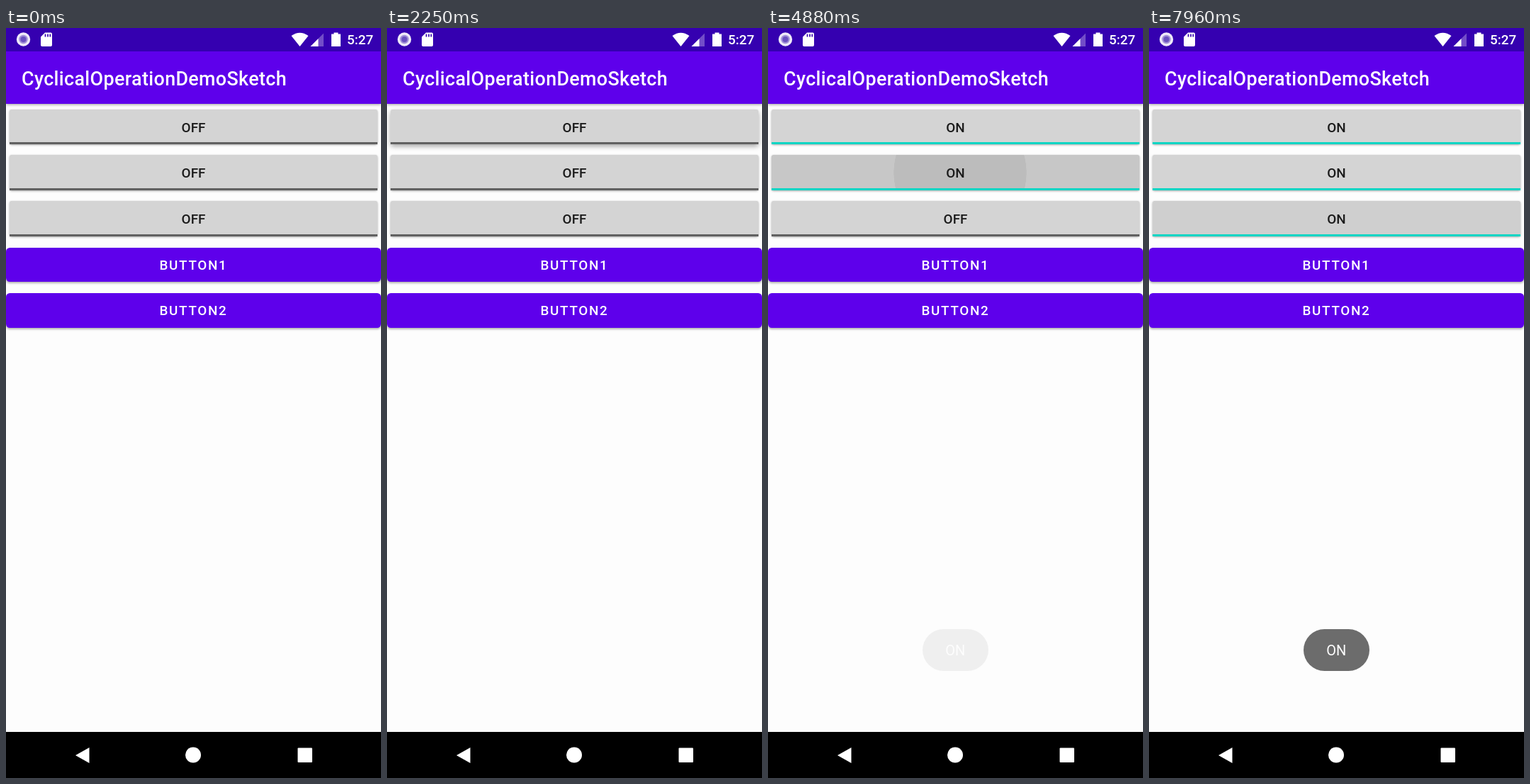
Write an HTML page that moves like this. It is 529x1058 px and loops after 8000 ms.

```html
<!DOCTYPE html>
<html lang="en">
<head>
<meta charset="utf-8">
<style>
  html, body { margin: 0; width: 100%; height: 100%; overflow: hidden; }
  body { position: relative; background: #fdfdfd; font: 500 18.86px Roboto, sans-serif; }
  body > *, .toggle > * { position: absolute; }
  .bar {
    left: 0; top: 0; width: 529px; height: 107px; background: #5e00eb;
    box-shadow: 0 1px 4px rgba(0, 0, 0, .4);
  }
  .status { left: 0; top: 0; width: 529px; height: 32.5px; background: #3500b0; }
  .title {
    left: 22px; top: 52px; line-height: 40px; font-size: 26.9px;
    letter-spacing: .0125em; color: #fff; white-space: nowrap;
  }
  .clock { left: 481px; top: 6px; line-height: 22px; color: #fff; }
  .toggle {
    left: 5px; width: 519px; height: 49.5px; border-radius: 3px;
    background: #d4d4d4; color: #1b1b1b; text-align: center; line-height: 52px;
  }
  .toggle > * { left: 0; width: 100%; }
  .ripple { top: 0; height: 100%; overflow: hidden; border-radius: 3px; }
  .line { bottom: 0; height: 3px; }
  .button {
    left: 0; width: 529px; height: 48.5px; border-radius: 5.4px; background: #5e00eb;
    color: #fff; text-align: center; line-height: 50px; letter-spacing: .0893em;
    box-shadow: 0 2px 3px rgba(0, 0, 0, .3);
  }
  .toast {
    left: 217.5px; top: 848px; width: 93.5px; height: 59px; border-radius: 29.5px;
    background: #646464; color: #fff; text-align: center; line-height: 60px;
    font-weight: 400; font-size: 20px; font-stretch: 75%;
  }
  svg { left: 0; top: 0; }
</style>
</head>
<body>
<div class="bar"></div>
<div class="status"></div>
<div class="title">CyclicalOperationDemoSketch</div>
<div class="clock">5:27</div>
<div class="button" style="top:309.5px">BUTTON1</div>
<div class="button" style="top:374.2px">BUTTON2</div>
<div class="toast">ON</div>
<svg width="529" height="1058" fill="#fff">
  <circle cx="24.5" cy="16" r="9.7" fill="#efeaf9"/>
  <circle cx="24.5" cy="16" r="6.2" fill="#a090d6"/>
  <circle cx="24.5" cy="16" r="4" fill="#6a50c0"/>
  <path d="M55 6.500H63Q65 6.500 65 8.500V24Q65 26 63 26H51Q49 26 49 24V12.500Z"/>
  <path d="M55.500 8.500v4M59 8.500v4M62.300 8.500v4" stroke="#3500b0" stroke-width="1.700"/>
  <path d="M402.500 11Q414.500 2.500 426.500 11L414.500 26Z"/>
  <path d="M448 7.500V26H429.500Z" opacity=".3"/>
  <path d="M440.500 15V26H429.500Z"/>
  <path d="M462.500 8.500V6.500H468.500V8.500H472V26H459V8.500Z"/>
  <rect y="993" width="529" height="65" fill="#000"/>
  <path d="M98 1026L117.500 1015V1037Z"/>
  <circle cx="264" cy="1025.500" r="11"/>
  <rect x="411.500" y="1015.500" width="20.500" height="20.500" rx="1"/>
</svg>
<script>
const LOOP = 8000, FADE = 500, TOAST_DELAY = 145, TOAST_HOLD = 1990;
const presses = [2200, 4695, 7345];
const progress = (t, start, length) => Math.min(1, Math.max(0, (t - start) / length));

function add(parent, className) {
  const element = document.createElement('div');
  element.className = className;
  return parent.appendChild(element);
}

const toast = document.querySelector('.toast');
const toggles = presses.map((press, i) => {
  const box = add(document.body, 'toggle');
  box.style.top = 114.7 + i * 64.7 + 'px';
  return { press, box, ripple: add(box, 'ripple'), line: add(box, 'line'), label: add(box, 'label') };
});

function drawToggle({ press, box, ripple, line, label }, t) {
  const on = t >= press + 115;
  label.textContent = on ? 'ON' : 'OFF';
  line.style.background = on ? '#0cd5c4' : '#616161';

  const lift = progress(t, press, 50) * (1 - progress(t, press + 100, 80));
  box.style.boxShadow = `0 ${1 + 2 * lift}px ${3 + 4 * lift}px rgba(0,0,0,.35)`;

  const radius = 265 * progress(t, press + 105, 230);
  const shade = .06 * progress(t, press + 70, 80);
  ripple.style.opacity = 1 - progress(t, press + 330, 370);
  ripple.style.background =
    `radial-gradient(circle at 266px 50%, rgba(0,0,0,.055) ${radius}px, transparent ${radius + .5}px), rgba(0,0,0,${shade})`;
  if (radius === 0) ripple.style.background = `rgba(0,0,0,${shade})`;
}

function toastAlpha(press, t) {
  const start = press + TOAST_DELAY;
  return progress(t, start, FADE) * (1 - progress(t, start + TOAST_HOLD, FADE));
}

function draw(now) {
  const t = now % LOOP;
  toggles.forEach(toggle => drawToggle(toggle, t));
  toast.style.opacity = Math.max(...presses.map(press => toastAlpha(press, t)));
  requestAnimationFrame(draw);
}
draw(0);
</script>
</body>
</html>
```
